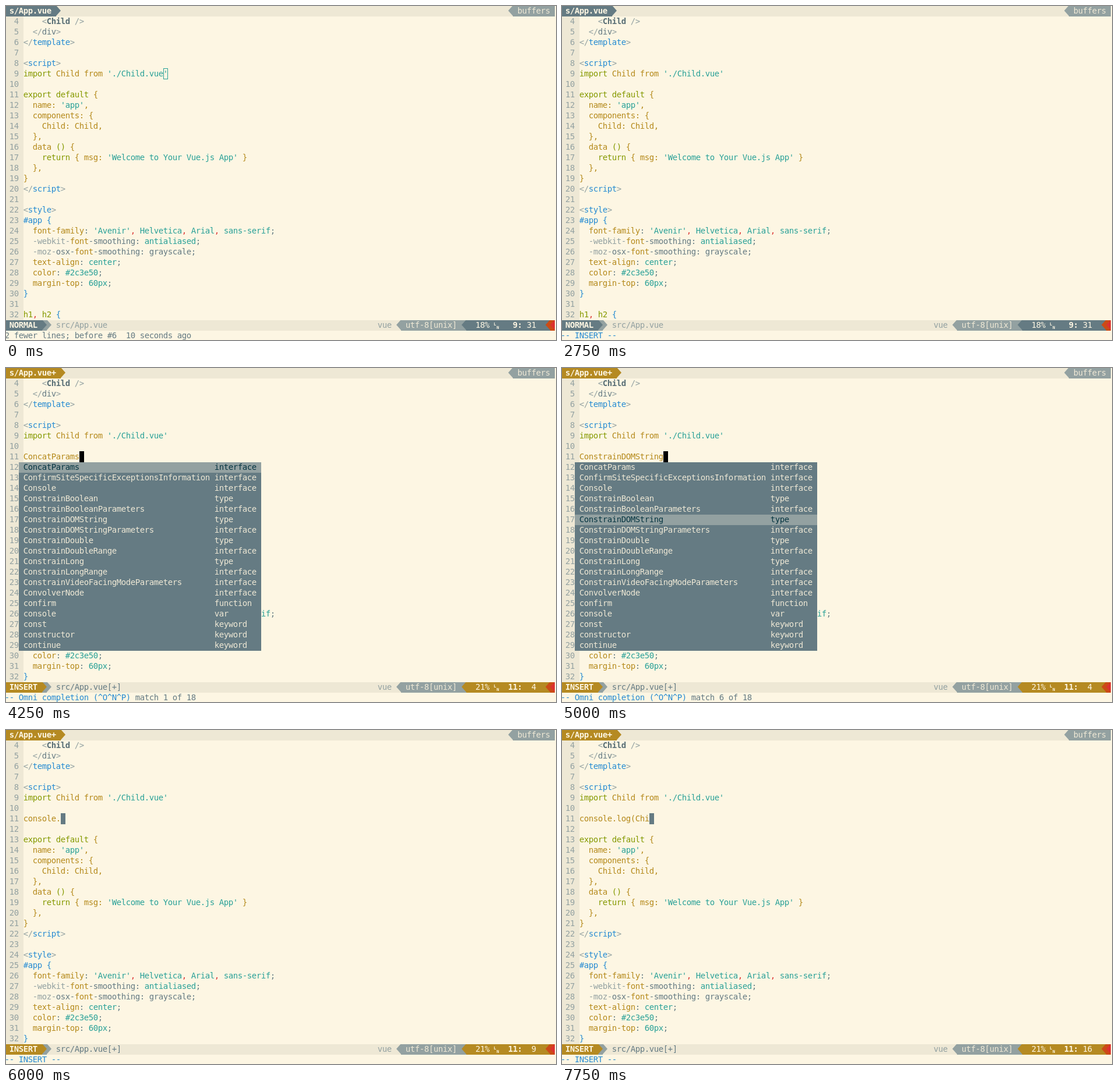
These frames come from a looping animation (944x574 px, 8 s). An HTML page with a canvas:

```html
<!DOCTYPE html>
<html lang="en">
<head>
<meta charset="utf-8">
<title>Editor completion</title>
<style>
html, body { margin: 0; width: 100%; height: 100%; overflow: hidden; background: #fdf6e3; }
canvas { display: block; width: 944px; height: 574px; }
</style>
</head>
<body>
<canvas id="stage" width="944" height="574"></canvas>
<script>
const ctx = document.getElementById('stage').getContext('2d');
const LOOP = 8000, CELL = 8, ROW = 18;
const FAMILY = '"DejaVu Sans Mono", "Noto Sans Mono", monospace';
const BG = '#fdf6e3', PANEL = '#eee8d5', GREY = '#93a1a1', SLATE = '#657b83', GOLD = '#b58a22';
const INK = {
  y: '#b58a1c', g: '#859900', c: '#2aa198', b: '#268bd2', r: '#dc322f',
  l: GREY, s: SLATE, d: '#586e75'
};

// Each run is a colour letter followed by its text; runs are split by "|".
const HEAD = [
  'l    <|DChild|l />',
  'l  </|sdiv|l>',
  'l</|btemplate|l>',
  '',
  'l<|bscript|l>',
  "gimport|y Child from |c'./Child.vue'"
];
const TAIL = [
  '',
  'gexport default|y {',
  "y  name: |c'app'|y,",
  'y  components: {',
  'y    Child: Child,',
  'y  },',
  'y  data |g()|y {',
  "g    return|y { msg: |c'Welcome to Your Vue.js App'|y }",
  'y  },',
  'y}',
  'l</|bscript|l>',
  '',
  'l<|bstyle|l>',
  'b#app {',
  "y  font-family|s: |c'Avenir'|r,|c Helvetica|r,|c Arial|r,|c sans-serif|s;",
  'l  -webkit-|yfont|s-smoothing: |cantialiased|s;',
  'l  -moz-|sosx-|yfont|s-smoothing: grayscale;',
  'y  text-align|s: |ccenter|s;',
  'y  color|s: |c#2c3e50|s;',
  'y  margin-top|s: |c60px|s;',
  'b}',
  '',
  'gh1|r,|g h2|b {'
];

const MATCHES = `ConcatParams interface
ConfirmSiteSpecificExceptionsInformation interface
Console interface
ConstrainBoolean type
ConstrainBooleanParameters interface
ConstrainDOMString type
ConstrainDOMStringParameters interface
ConstrainDouble type
ConstrainDoubleRange interface
ConstrainLong type
ConstrainLongRange interface
ConstrainVideoFacingModeParameters interface
ConvolverNode interface
confirm function
console var
const keyword
constructor keyword
continue keyword`.split('\n').map(s => s.split(' '));

const INSERT = 'b-- INSERT --', OMNI = 'b-- Omni completion (^O^N^P) ';
const start = { line: 9, col: 31, pct: 18, text: '', cursor: 'hollow',
                msg: 's2 fewer lines; before #6  10 seconds ago' };
const typed = (text, extra) =>
  ({ line: 11, col: text.length + 1, pct: 21, text, cursor: 'block', msg: INSERT, ...extra });
const pick = n => typed(MATCHES[n - 1][0],
  { col: 4, cursor: 'black', match: n, msg: `${OMNI}|smatch ${n} of ${MATCHES.length}` });

const STEPS = [
  [0, start],
  [1750, { ...start, cursor: 'teal' }],
  [2750, { ...start, cursor: '', msg: INSERT }],
  [3000, typed('', { line: 10, pct: 19 })],
  [3250, typed('')],
  [3750, typed('con')],
  [4250, pick(1)],
  [4750, pick(2)],
  [5000, pick(6)],
  [5250, pick(10)],
  [5500, pick(14)],
  [5750, pick(15)],
  [6000, typed('console.')],
  [6250, typed('console.lo')],
  [6500, typed('console.lo', { msg: OMNI + 'Searching...' })],
  [6750, typed('console.log', { msg: OMNI + 'The only match' })],
  [7000, typed('console.log', { msg: '', cursor: '' })],
  [7250, typed('console.log(')],
  [7500, typed('console.log(C')],
  [7750, typed('console.log(Chi')]
];

const colX = col => col * CELL - 2;

function box(x, y, w, h, color) {
  ctx.fillStyle = color;
  ctx.fillRect(x, y, w, h);
}

// Glyphs sit centred in their cells.
function text(str, col, row, color, bold) {
  ctx.font = `${bold ? 'bold ' : ''}14px ${FAMILY}`;
  ctx.textAlign = 'center';
  ctx.fillStyle = color;
  [...str].forEach((ch, i) => {
    if (ch !== ' ') ctx.fillText(ch, colX(col + i) + CELL / 2, row * ROW + 13);
  });
}

function runs(source, col, row) {
  if (!source) return;
  for (const run of source.split('|')) {
    const key = run[0], str = run.slice(1);
    text(str, col, row, INK[key.toLowerCase()], key === 'D');
    col += str.length;
  }
}

// Arrow-shaped separator, one cell wide; dir 1 points right, -1 left.
function arrow(col, row, dir, color, back) {
  const x = colX(col), y = row * ROW, top = y - 1;
  if (back) box(x, y, CELL, ROW, back);
  const base = dir > 0 ? x : x + CELL;
  ctx.save();
  ctx.beginPath();
  ctx.rect(x, y, CELL, ROW);
  ctx.clip();
  ctx.fillStyle = color;
  ctx.beginPath();
  ctx.moveTo(base, top);
  ctx.lineTo(base + dir * CELL, top + ROW / 2);
  ctx.lineTo(base, top + ROW);
  ctx.fill();
  ctx.restore();
}

function bar(from, to, row, color) {
  box(colX(from), row * ROW, (to - from) * CELL, ROW, color);
}

function tabs(accent, edited) {
  const name = edited ? 's/App.vue+' : 's/App.vue', end = name.length + 2;
  bar(0, 118, 0, PANEL);
  bar(0, end, 0, accent);
  arrow(end, 0, 1, accent);
  text(name, 1, 0, BG, true);
  arrow(108, 0, -1, GREY);
  bar(109, 118, 0, GREY);
  text('buffers', 110, 0, PANEL);
}

function status(s, accent, edited) {
  const r = 30;
  bar(0, 118, r, PANEL);
  bar(0, 8, r, accent);
  text(edited ? 'INSERT' : 'NORMAL', 1, r, BG, true);
  arrow(8, r, 1, accent, GREY);
  arrow(9, r, 1, GREY, PANEL);
  text(edited ? 'src/App.vue[+]' : 'src/App.vue', 11, r, edited ? SLATE : GREY);
  text('vue', 80, r, GREY);
  arrow(84, r, -1, GREY);
  bar(85, 98, r, GREY);
  text('utf-8[unix]', 86, r, PANEL);
  arrow(98, r, -1, accent, GREY);
  bar(99, 116, r, accent);
  text(s.pct + '%', 101, r, BG);
  ctx.font = `bold 7px ${FAMILY}`;
  ctx.fillText('L', 839, 549);
  ctx.fillText('N', 844, 555);
  text(String(s.line).padStart(3) + ':', 107, r, BG, true);
  text(String(s.col).padStart(3), 111, r, BG);
  arrow(116, r, -1, '#cb4b16', accent);
  arrow(117, r, -1, INK.r, '#cb4b16');
}

function popup(selected) {
  MATCHES.forEach(([word, kind], i) => {
    const on = i + 1 === selected, ink = on ? '#073642' : PANEL;
    bar(3, 55, 9 + i, on ? GREY : SLATE);
    text(word, 4, 9 + i, ink);
    text(kind, 45, 9 + i, ink);
  });
}

function cursor(s, edited) {
  if (!s.cursor) return;
  const col = edited ? 4 + s.text.length : 34, row = s.line - 3;
  const x = colX(col), y = row * ROW - 1;
  if (s.cursor === 'hollow') {
    ctx.strokeStyle = INK.c;
    ctx.lineWidth = 1;
    ctx.strokeRect(x + 0.5, y + 0.5, CELL - 1, ROW);
    return;
  }
  box(x, y, CELL, ROW + 1, { teal: INK.c, block: SLATE, black: '#000' }[s.cursor]);
  if (s.cursor === 'teal') text("'", col, row, BG);
}

function draw(s) {
  const edited = s.line > 9, accent = edited ? GOLD : SLATE;
  const added = { 9: [], 10: [''], 11: ['', s.text && 'y' + s.text] }[s.line];
  box(0, 0, 944, 574, BG);
  box(0, ROW, 30, 29 * ROW, PANEL);
  [...HEAD, ...added, ...TAIL].slice(0, 29).forEach((source, i) => {
    text(String(i + 4).padStart(2), 1, i + 1, GREY);
    runs(source, 4, i + 1);
  });
  tabs(accent, edited);
  status(s, accent, edited);
  runs(s.msg, 0, 31);
  if (s.match) popup(s.match);
  cursor(s, edited);
}

let shown;
function tick() {
  const t = performance.now() % LOOP;
  const step = STEPS.filter(([at]) => at <= t).pop()[1];
  if (step !== shown) draw(shown = step);
  requestAnimationFrame(tick);
}
tick();
</script>
</body>
</html>
```
